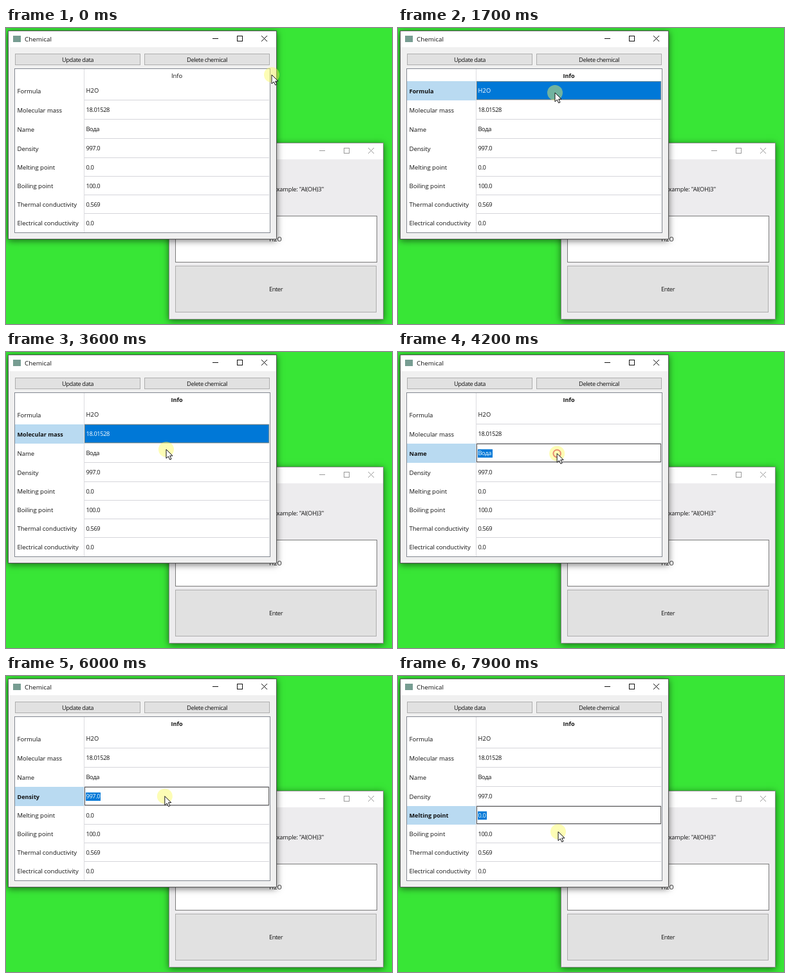
Recreate the animation shown at these times as an HTML page with a canvas. Size 600 by 462 pixels, loop 8 s.

```html
<!DOCTYPE html>
<html lang="en">
<head>
<meta charset="utf-8">
<title>Chemical</title>
<style>
  html, body { margin: 0; width: 100%; height: 100%; overflow: hidden; background: #38e636; }
  canvas { display: block; }
</style>
</head>
<body>
<canvas id="stage" width="600" height="462"></canvas>
<script>
const ctx = document.getElementById('stage').getContext('2d');
const LOOP = 8000, BLUE = '#0078d7';
const rows = [
  ['Formula', 'H2O'], ['Molecular mass', '18.01528'], ['Name', 'Вода'], ['Density', '997.0'],
  ['Melting point', '0.0'], ['Boiling point', '100.0'],
  ['Thermal conductivity', '0.569'], ['Electrical conductivity', '0.0']
];
const tops = [83, 113, 143, 173, 203, 232, 261, 290, 319];

// Pointer path: time, x, y
const path = [
  [0, 413, 73], [200, 405, 76], [800, 244, 101], [2000, 244, 101], [2400, 245, 128],
  [3100, 245, 128], [3600, 249, 152], [3800, 248, 158], [4700, 246, 159], [5200, 246, 186],
  [6300, 247, 188], [6700, 249, 218], [7400, 249, 218], [7800, 249, 243], [8000, 249, 243]
];
const clicks = [950, 1300, 2450, 2750, 3850, 4050, 5400, 5600, 6800, 7050];
// Selection changes: time, row, editor open
const states = [
  [0, -1, false], [1100, 0, false], [2600, 1, false], [3900, 2, false], [4100, 2, true],
  [5500, 3, false], [5700, 3, true], [6900, 4, false], [7100, 4, true]
];

function box(x, y, w, h, fill, edge) {
  ctx.fillStyle = fill;
  ctx.fillRect(x, y, w, h);
  if (edge) {
    ctx.strokeStyle = edge;
    ctx.lineWidth = 1;
    ctx.strokeRect(x + .5, y + .5, w - 1, h - 1);
  }
}

function line(color, ...points) {
  ctx.strokeStyle = color;
  ctx.lineWidth = 1;
  ctx.beginPath();
  for (let i = 0; i < points.length; i += 4) {
    ctx.moveTo(points[i], points[i + 1]);
    ctx.lineTo(points[i + 2], points[i + 3]);
  }
  ctx.stroke();
}

function text(str, x, y, { size = 9.3, gap = -.4, align = 'left', bold = false, color = '#111' } = {}) {
  ctx.font = `${bold ? 'bold ' : ''}${size}px "Open Sans", "Noto Sans", sans-serif`;
  ctx.letterSpacing = gap + 'px';
  ctx.textAlign = align;
  ctx.fillStyle = color;
  ctx.fillText(str, x, y + 3.5);
}

function button(label, x, y, w, h) {
  box(x, y, w, h, '#e1e1e1', '#adadad');
  text(label, x + w / 2, y + h / 2, { align: 'center' });
}

function frame(x, y, w, h, edge, ink, body) {
  ctx.save();
  ctx.shadowColor = 'rgba(0,0,0,.55)';
  ctx.shadowBlur = 10;
  ctx.shadowOffsetY = 2;
  box(x, y, w, h, body);
  ctx.restore();
  box(x, y, w, h, body, edge);
  box(x + 1, y + 1, w - 2, 25, '#fff');
  const r = x + w, m = y + 12.5;
  line(ink, r - 100, m, r - 91, m, r - 24, m - 4.5, r - 15, m + 4.5, r - 24, m + 4.5, r - 15, m - 4.5);
  ctx.strokeRect(r - 61.5, m - 4, 8, 8);
}

function backWindow() {
  frame(253, 179, 334, 276, '#8a8a8a', '#999', '#edecee');
  text('Example: "Al(OH)3"', 494, 251, { align: 'right', gap: -.2 });
  box(263, 293, 314, 73, '#fff', '#7a7a7a');
  text('H2O', 419, 329.5, { align: 'center', gap: 0 });
  button('Enter', 263, 371, 313, 73);
  ctx.fillStyle = '#edecee';
}

function frontWindow(selected, editing) {
  frame(3, 4, 418, 326, '#555', '#111', '#f0f0f0');
  box(11, 12, 12, 10, '#779d92');
  text('Chemical', 29, 17, { size: 9.8, gap: 0 });
  button('Update data', 14, 40, 195, 18);
  button('Delete chemical', 215, 40, 195, 18);
  box(13, 63, 398, 257, '#fff', '#828790');
  line('#dcdce0', 121.5, 64, 121.5, 319);
  const active = selected >= 0;
  text('Info', 265.5, 74, { size: active ? 9.1 : 9.4, gap: 0, align: 'center', bold: active });

  rows.forEach(([label, value], i) => {
    const y = tops[i], h = tops[i + 1] - y, mid = y + h / 2 + .3;
    const on = i === selected;
    if (i < 7) line('#d5d5da', 122, y + h - .5, 409, y + h - .5);
    if (on) {
      box(14, y, 107, h, '#b9daf1');
      if (editing) {
        box(122, y, 287, h - 1, '#fff', '#555');
        box(124, mid - 6.5, value.length > 4 || i === 2 ? 23 : 14, 13, BLUE);
      } else {
        box(122, y, 287, h - 1, BLUE);
        ctx.setLineDash([1, 1]);
        ctx.strokeStyle = '#b58a4a';
        ctx.strokeRect(122.5, y + .5, 286, h - 2);
        ctx.setLineDash([]);
      }
    }
    text(label, 17.5, mid, { size: on ? 9.1 : 9.5, gap: 0, bold: on });
    text(value, 124.5, mid - .5, { gap: i ? -.4 : .2, color: on ? '#fff' : '#111' });
  });
}

function pointerAt(t) {
  const i = Math.max(1, path.findIndex(p => p[0] > t));
  const [t0, x0, y0] = path[i - 1], [t1, x1, y1] = path[i];
  const k = (t - t0) / (t1 - t0), e = k * k * (3 - 2 * k);
  return [x0 + (x1 - x0) * e, y0 + (y1 - y0) * e];
}

function circle(r, fill, stroke) {
  ctx.beginPath();
  ctx.arc(0, 0, r, 0, Math.PI * 2);
  if (fill) { ctx.fillStyle = fill; ctx.fill(); }
  if (stroke) { ctx.strokeStyle = stroke; ctx.lineWidth = 2; ctx.stroke(); }
}

const arrow = new Path2D('M0 0V14L3.3 11L5.7 16L8 15L5.7 10H10Z');

function pointer(t) {
  ctx.save();
  ctx.translate(...pointerAt(t));
  circle(12, 'rgba(250,250,90,.45)');
  const age = Math.min(...clicks.map(c => t >= c ? t - c : LOOP));
  if (age < 90) circle(3, '#c8283c');
  else if (age < 250) circle(3 + age / 55, null, `rgba(215,35,50,${1.2 - age / 220})`);
  ctx.fillStyle = '#fff';
  ctx.fill(arrow);
  ctx.strokeStyle = '#111';
  ctx.lineWidth = 1;
  ctx.stroke(arrow);
  ctx.restore();
}

function draw(now) {
  const t = Math.floor(now % LOOP / 100) * 100;
  const [, selected, editing] = states.filter(s => s[0] <= t).pop();
  box(0, 0, 600, 462, '#38e636');
  backWindow();
  frontWindow(selected, editing);
  pointer(t);
  requestAnimationFrame(draw);
}
requestAnimationFrame(draw);
</script>
</body>
</html>
```
